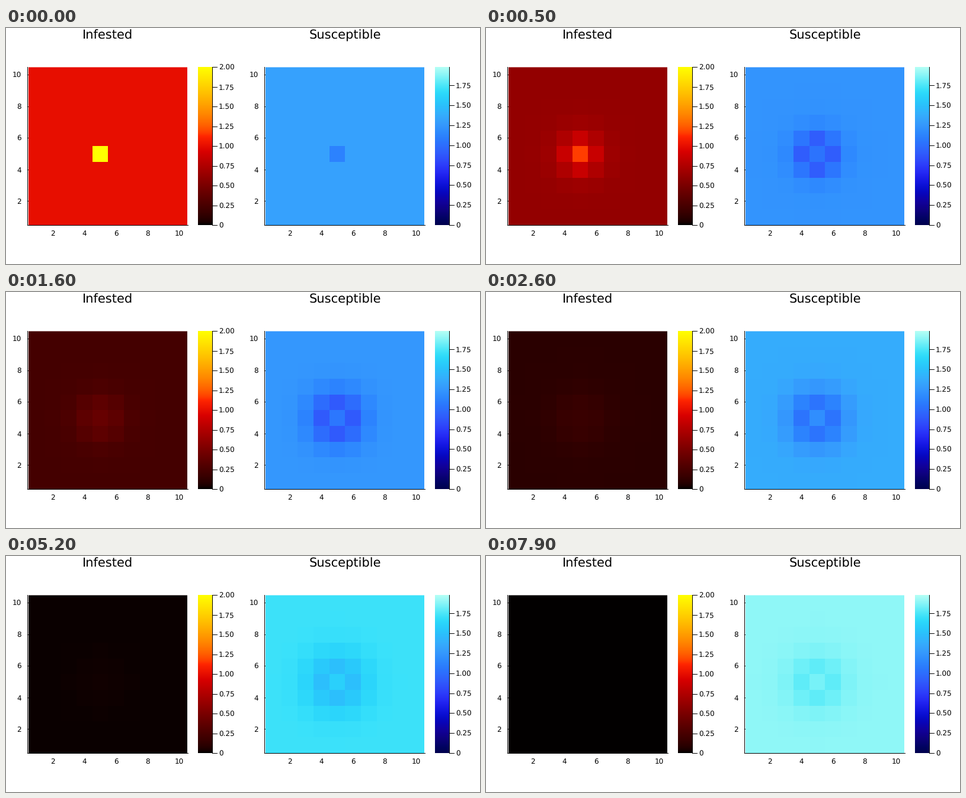
Recreate the animation shown at these times as a matplotlib script. Size 800x400 px, loop 8 s.

```python
import numpy as np
import matplotlib.pyplot as plt
from matplotlib.animation import FuncAnimation
from matplotlib.colors import ListedColormap

W, H, DPI = 800, 400, 100
FRAMES, INTERVAL = 80, 100
LEFT, TOP, BOTTOM, CELL = 38.5, 66.5, 334, 26.75
CAPACITY = 2.0

plt.rcParams["font.family"] = "DejaVu Sans"
plt.rcParams["text.hinting"] = "none"


def to_linear(c):
    return np.where(c <= 0.04045, c / 12.92, ((c + 0.055) / 1.055) ** 2.4)


def to_srgb(c):
    c = np.clip(c, 0, 1)
    return np.where(c <= 0.0031308, c * 12.92, 1.055 * c ** (1 / 2.4) - 0.055)


def black_red_yellow(n=1024):
    """RGB path through black, red and yellow with evenly rising lightness."""
    t = np.linspace(0, 3, 3000)
    red = np.interp(t, range(4), [0, 0.85, 1, 1])
    green = np.interp(t, range(4), [0, 0, 0.15, 1])
    lum = 0.2126 * to_linear(red) + 0.7152 * to_linear(green)
    light = np.where(lum > 0.008856, 116 * np.cbrt(lum) - 16, 903.3 * lum)
    even = np.linspace(0, light[-1], n)
    rgb = [np.interp(even, light, red), np.interp(even, light, green), 0 * even]
    return ListedColormap(np.column_stack(rgb))


def blue_cyan(n=1024):
    """Lab path from dark blue to pale cyan, rounded at its control points."""
    light = np.linspace(5, 95, n)
    knots = np.arange(-5, 106, 10)
    a = [12, 31, 50, 65, 70, 45, 20, 0, -22, -38, -25, -12]
    b = [-24, -45, -66, -90, -100, -85, -70, -53, -37, -20, -3, 14]
    spread = np.linspace(-5, 5, 41)
    a, b = (np.interp(light[:, None] + spread, knots, v).mean(axis=1) for v in (a, b))
    fy = (light + 16) / 116
    f = np.array([fy + a / 500, fy, fy - b / 200])
    xyz = np.where(f > 6 / 29, f ** 3, (f - 4 / 29) * 3 * (6 / 29) ** 2)
    xyz *= np.array([[0.9505], [1], [1.089]])
    matrix = np.array([[3.2406, -1.5372, -0.4986],
                       [-0.9689, 1.8758, 0.0415],
                       [0.0557, -0.2040, 1.0570]])
    return ListedColormap(to_srgb(matrix @ xyz).T)


# Squared distance of every cell from the outbreak at (5, 5), top row first.
col, row = np.meshgrid(np.arange(1, 11), np.arange(10, 0, -1))
DIST2 = (col - 5) ** 2 + (row - 5) ** 2
SEED = DIST2 == 0


def reach(t, delay):
    """How far the outbreak has taken hold, slower with distance."""
    return 1 - np.exp(-(t + 1e-3) / (delay * DIST2 + 1e-6))


def infested(t):
    background = np.exp(-0.098 * t + 0.00026 * t * t)
    excess = 0.75 * np.exp(-DIST2 / 5) * reach(t, 5)
    return background * (1 + excess + 0.25 * SEED * np.exp(-t / 9))


def susceptible(t):
    """Logistic regrowth, held back by the fading infestation."""
    growth = 0.64 + 0.0415 * t - 1.02 * (1 - np.exp(-0.096 * t))
    loss = (0.95 * np.exp(-DIST2 / 3.5) - 0.55 * SEED) * reach(t, 2.2)
    return CAPACITY / (1 + np.exp(loss - growth))


fig = plt.figure(figsize=(W / DPI, H / DPI), dpi=DPI, facecolor="white")
ax = fig.add_axes([0, 0, 1, 1])
ax.axis("off")


def line(x0, y0, x1, y1, **style):
    ax.plot([x0, x1], [y0, y1], lw=0.72, solid_capstyle="butt", snap=False,
            **{"color": "black", **style})


def label(x, y, text, px=12, ha="center"):
    ax.text(x, y + 0.365 * px, text, fontsize=px * 72 / DPI, ha=ha, va="baseline")


def pixel_centre(y):
    return np.floor(y) + 0.5


def panel(x, title, cmap, top_value, values):
    label(x + 172, 10.7, title, 21)
    edges = np.arange(11) * CELL
    mesh = ax.pcolormesh(x + np.rint(LEFT + edges), np.rint(TOP + edges), values(0),
                         cmap=cmap, vmin=0, vmax=top_value, antialiased=False)
    line(x + 38, 66.5, x + 306, 66.5, color="white", alpha=0.5)
    line(x + 36.5, 66, x + 36.5, 335)
    line(x + 36, 334.5, x + 308, 334.5)
    for n in range(2, 11, 2):
        offset = (n - 0.5) * CELL
        y = pixel_centre(BOTTOM - offset)
        line(x + 36, y, x + 38, y)
        label(x + 25.7, y, str(n), ha="right")
        label(x + LEFT + offset, 348, str(n))

    ax.imshow(np.linspace(1, 0, 268)[:, None], cmap=cmap, vmin=0, vmax=1,
              aspect="auto", interpolation="nearest",
              extent=(x + 324, x + 348, BOTTOM, 66))
    line(x + 348.5, 66, x + 348.5, 335)
    for v in np.arange(0, top_value + 0.01, 0.25):
        y = pixel_centre(334.5 - v / top_value * 268)
        line(x + 348, y, x + 357, y)
        label(x + 359, y, f"{v:.2f}" if v else "0", ha="left")
    return mesh, values


panels = [
    panel(0, "Infested", black_red_yellow(), 2.0, infested),
    panel(400, "Susceptible", blue_cyan(), 1.982, susceptible),
]
ax.set_xlim(0, W)
ax.set_ylim(H, 0)


def update(k):
    for mesh, values in panels:
        mesh.set_array(values(k))
    return [mesh for mesh, _ in panels]


anim = FuncAnimation(fig, update, frames=FRAMES, interval=INTERVAL,
                     repeat=True, repeat_delay=0)
plt.show()
```
